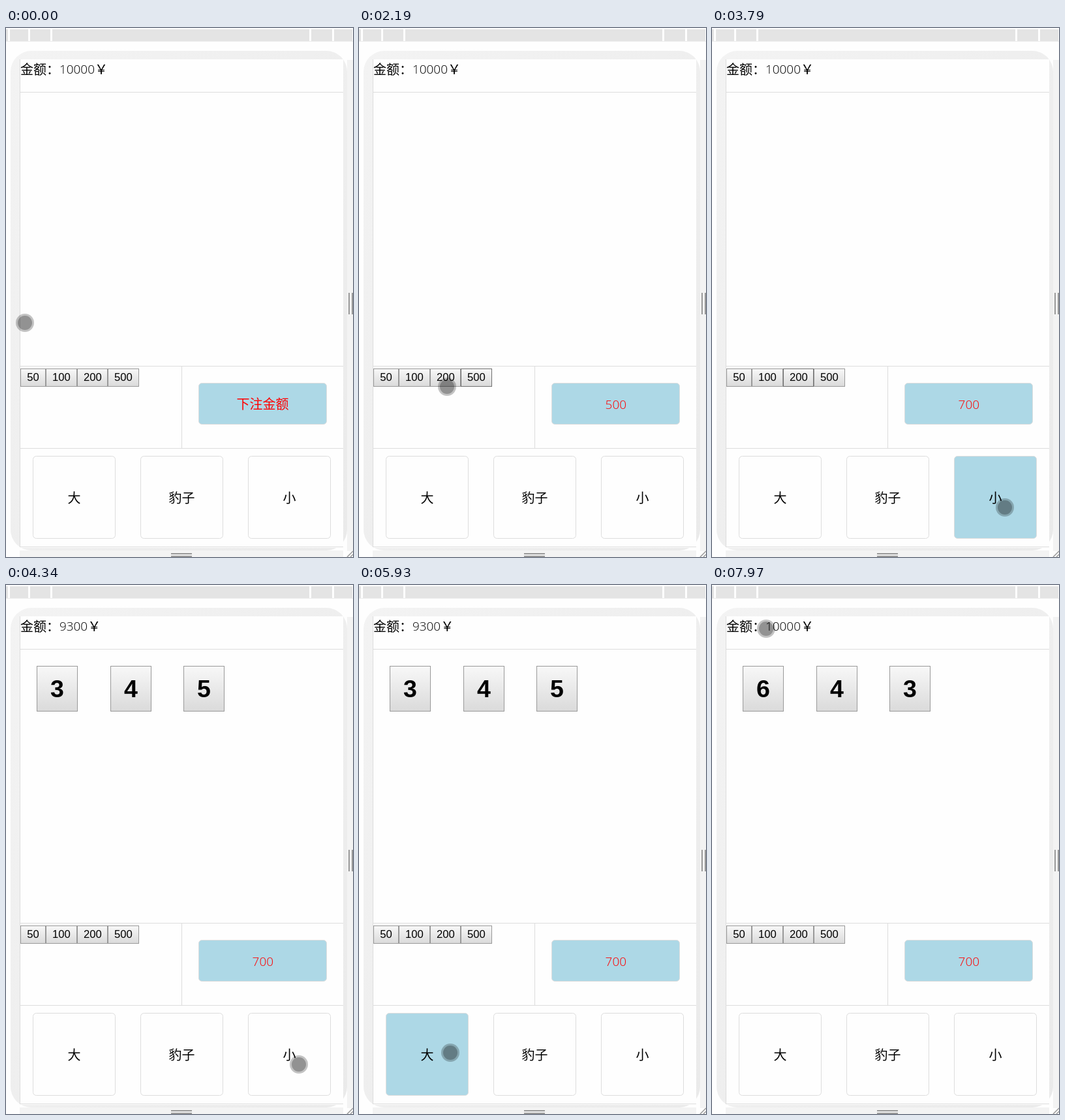
Animation, 532 px wide and 811 px high, one loop 8 s. Source, as an HTML page:

```html
<!DOCTYPE html>
<html lang="zh-CN">
<head>
<meta charset="utf-8">
<title>Dice</title>
<style>
  html, body { margin: 0; width: 100%; height: 100%; overflow: hidden; background: #fefefe; }
  svg { display: block; width: 532px; height: 811px; }
  text { font: 350 20px "Noto Sans CJK SC", "Noto Sans CJK", "Noto Sans CJK JP", sans-serif; }
  .mid { text-anchor: middle; }
  .yen { font-weight: 500; }
  .num { font: 350 18.9px "Open Sans", "Noto Sans", sans-serif; }
  .chip { font: 16.67px "Liberation Sans", Arial, sans-serif; }
  .die { font: bold 37.5px "Liberation Sans", Arial, sans-serif; }
  .line { stroke: #ddd; fill: none; }
  .grip { fill: #999; }
</style>
</head>
<body>
<svg id="stage" viewBox="0 0 532 811" lang="zh-CN">
  <defs>
    <linearGradient id="shell" x2="1" y2="1">
      <stop stop-color="#f3f3f3"/><stop offset="1" stop-color="#eaeaea"/>
    </linearGradient>
    <linearGradient id="face" x2="0" y2="1">
      <stop stop-color="#f8f8f8"/><stop offset=".5" stop-color="#e9e9e9"/><stop offset="1" stop-color="#dadada"/>
    </linearGradient>
    <linearGradient id="down" x2="0" y2="1">
      <stop stop-color="#d4d4d4"/><stop offset="1" stop-color="#ececec"/>
    </linearGradient>
  </defs>
</svg>
<script>
const LOOP = 8000, FUNDS = 10000, ROLL_STEP = 130, SCREEN_TOP = 48;
const stage = document.getElementById('stage');

function add(tag, attrs, text, parent = stage) {
  const el = document.createElementNS('http://www.w3.org/2000/svg', tag);
  for (const k in attrs) el.setAttribute(k, attrs[k]);
  if (text !== undefined) el.textContent = text;
  parent.appendChild(el);
  return el;
}
const rect = (x, y, width, height, fill, extra) =>
  add('rect', { x, y, width, height, fill, ...extra });
const label = (x, y, text, cls = '', fill = '#000') =>
  add('text', { x, y, class: cls, fill }, text);
const line = d => add('path', { d, class: 'line' });
const show = (el, on) => el.setAttribute('visibility', on ? 'visible' : 'hidden');

// Width ruler and device shell
rect(0, 2, 531, 18, '#e4e4e4');
[3, 34, 68, 465, 500].forEach(x => rect(x, 2, 3, 18, '#fefefe'));
rect(0, 20, 532, 1, '#ececec');
rect(523, 49, 9, 753, '#f3f3f3');
rect(21, 801, 496, 10, '#f3f3f3');
rect(7, 35, 516, 766, 'url(#shell)', { rx: 32 });
rect(21, SCREEN_TOP, 496, 749, '#fefefe');
[0, 1].forEach(i => {
  rect(525 + 5 * i, 406, 2, 33, '', { class: 'grip' });
  rect(253, 805 + 4 * i, 32, 2, '', { class: 'grip' });
});
add('path', { d: 'M523 811L532 802M528 811L532 807', stroke: '#999', 'stroke-width': 1.5 });

// Page layout
line('M21.5 48V796M21 98.5H517M21 518.5H517M21 644.5H517M21 795.5H517M269.5 518V644');
label(22, 70.5, '金额：');
const money = label(82, 70, '', 'num');
const yen = label(136, 70.5, '￥', 'yen');

let left = 22;
const chips = [50, 100, 200, 500].map(v => {
  const w = v < 100 ? 39 : 47.7;
  const x = Math.round(left);
  left += w;
  const box = rect(x + .5, 522.5, Math.round(left) - x - 1, 27, 'url(#face)');
  label(x + w / 2, 541, v, 'chip mid');
  return { box, v };
});

rect(295.5, 544.5, 196, 63, '#add8e6', { rx: 5, stroke: '#ddd' });
const hint = label(393.5, 584, '下注金额', 'mid', '#f00');
const bet = label(393.8, 584, '', 'num mid', '#f00');

const cards = ['大', '豹子', '小'].map((name, i) => {
  const x = 41 + 165 * i;
  const box = rect(x + .5, 656.5, 126, 126, '#fefefe', { rx: 5, stroke: '#ddd' });
  label(x + 63.5, 728, name, 'mid');
  return box;
});

const dice = [0, 1, 2].map(i => {
  const x = 47 + Math.round(112.5 * i);
  const g = add('g', {});
  add('rect', { x: x + .5, y: 124.5, width: 62, height: 69, fill: 'url(#face)', stroke: '#999' }, undefined, g);
  return { g, text: add('text', { x: x + 31.5, y: 172, class: 'die mid' }, '', g) };
});

// Touch pointer and desktop arrow
const touch = add('g', {});
add('circle', { r: 14, 'fill-opacity': .23 }, undefined, touch);
add('circle', { r: 11, 'fill-opacity': .25 }, undefined, touch);
const arrow = add('path', {
  d: 'M.5 .5V16.5L4.2 13L6.5 18.5L8.8 17.5L6.6 12.2H11.5Z', fill: '#fff', stroke: '#000'
});

// Each move: start ms, end ms, destination
const moves = [
  [0, 0, 29, 452], [250, 650, 100, 532], [650, 1060, 171, 545], [1820, 2190, 135, 550],
  [2300, 2440, 118, 535], [2900, 3240, 364, 707], [3360, 3510, 449, 735],
  [4980, 5380, 140, 717], [7510, 7590, 160, -60], [7760, 7970, 83, 67]
];
const taps = [
  { press: 1490, release: 1610, value: 500 },
  { press: 2710, release: 2830, value: 200 }
];
const rounds = [
  { press: 3790, release: 3940, end: 4340, card: 2, faces: [3, 4, 5] },
  { press: 5930, release: 6050, end: 6560, card: 0, faces: [6, 4, 3] }
];

function pointer(t) {
  let x = 0, y = 0;
  for (const [from, to, tx, ty] of moves) {
    if (t < from) break;
    const p = Math.min(1, (t - from) / (to - from || 1));
    const e = to > from ? 1 - (1 - p) ** 2 : 1;
    x += (tx - x) * e;
    y += (ty - y) * e;
  }
  return [x, y];
}

function randomFace(seed) {
  const r = Math.sin(seed * 12.9898) * 43758.5453;
  return 1 + Math.floor((r - Math.floor(r)) * 6);
}

function wins({ card, faces: [a, b, c] }) {
  if (a === b && b === c) return card === 1;
  return card === (a + b + c > 10 ? 0 : 2);
}

function draw(now) {
  const t = now % LOOP;
  const holds = a => t >= a.press && t < a.release;

  const [x, y] = pointer(t);
  for (const el of [touch, arrow]) el.setAttribute('transform', `translate(${x} ${y})`);
  show(touch, y >= SCREEN_TOP);
  show(arrow, y < SCREEN_TOP);

  const stake = taps.reduce((sum, a) => sum + (t >= a.release ? a.value : 0), 0);
  bet.textContent = stake || '';
  show(hint, !stake);

  const funds = rounds.reduce((sum, r) => t < r.end ? sum : sum + (wins(r) ? stake : -stake), FUNDS);
  money.textContent = funds;
  yen.setAttribute('x', 82 + 10.8 * String(funds).length);

  const tap = taps.filter(a => t >= a.press).pop();
  const focused = tap && t < rounds[0].release ? tap.value : 0;
  chips.forEach(({ box, v }) => {
    box.setAttribute('fill', v === focused && holds(tap) ? 'url(#down)' : 'url(#face)');
    box.setAttribute('stroke', v === focused ? '#707070' : '#999');
  });

  const held = rounds.find(holds);
  cards.forEach((box, i) => box.setAttribute('fill', held && held.card === i ? '#add8e6' : '#fefefe'));

  const round = rounds.filter(r => t >= r.release).pop();
  dice.forEach(({ g, text }, i) => {
    show(g, round);
    if (!round) return;
    const step = Math.floor((t - round.release) / ROLL_STEP);
    text.textContent = t >= round.end ? round.faces[i] : randomFace(round.release + step * 3 + i);
  });
}

const start = performance.now();
function tick() {
  draw(performance.now() - start);
  requestAnimationFrame(tick);
}
tick();
</script>
</body>
</html>
```
